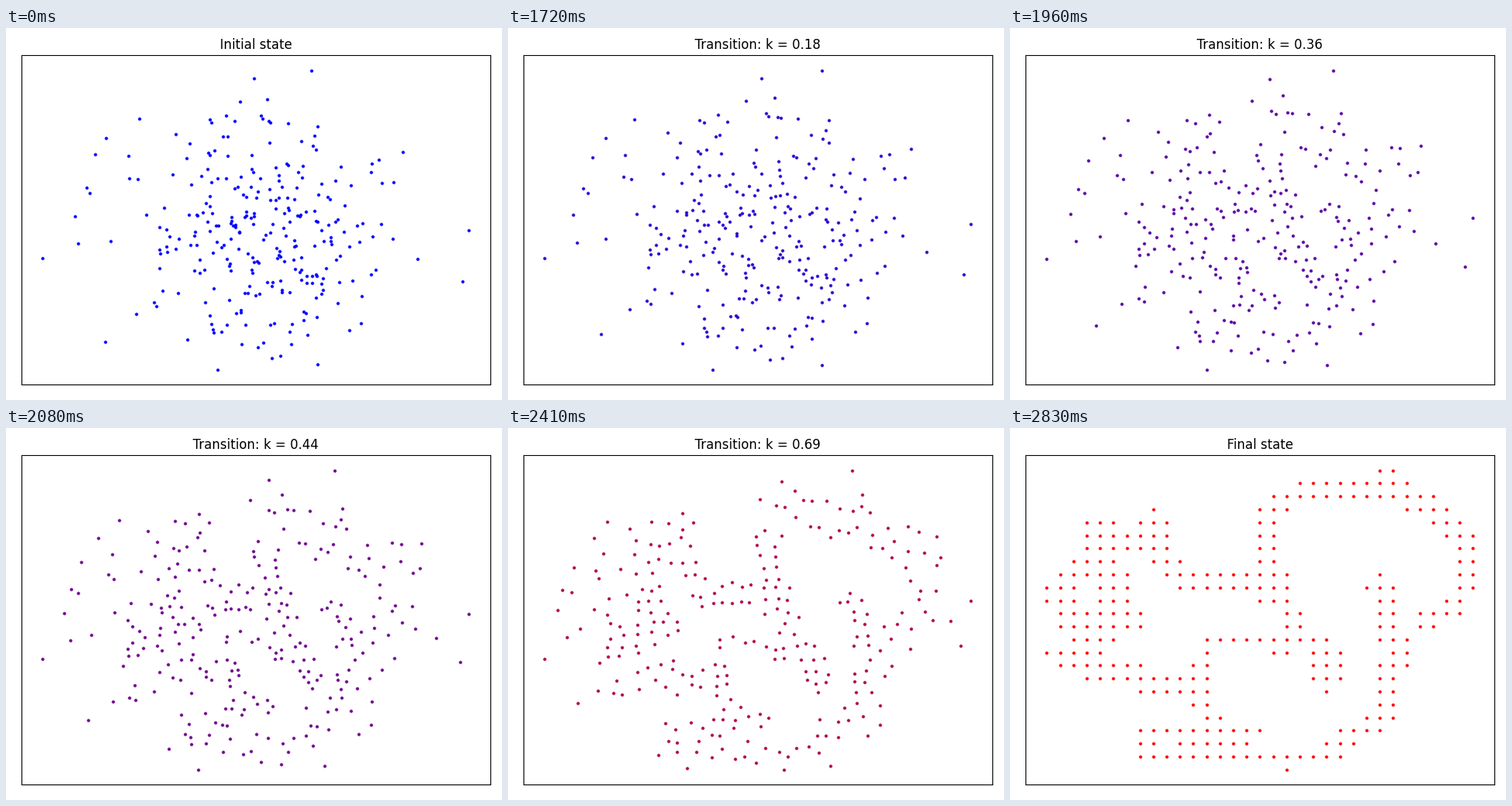
Write a matplotlib script that moves like this. It is 640 px wide and 480 px high and loops after 4.81 s.

```python
import numpy as np
import matplotlib.pyplot as plt
from matplotlib.animation import FuncAnimation

WIDTH, HEIGHT, DPI = 640, 480, 100
INTERVAL, LOOP = 10, 4810
MOVE_START, STEP_MS, STEPS = 1480, 30, 45
COLS, ROWS = 33, 24
SHRINK = np.array([0.68, 0.6])  # final extent relative to the initial one

# The final figure: lattice nodes close to a few brush strokes (column, row).
BROAD, FINE = 1.05, 0.6
BROAD_STROKES = [
    [(17.5, 2.2), (21, 1.4), (26, 0.9), (29, 3.3),
     (31.5, 5), (31.5, 8.5), (30.5, 10.5), (28.7, 11.3)],
    [(17, 3), (16.3, 5), (16.6, 7), (17.5, 9.5), (18.5, 11.5), (17.5, 14)],
    [(8, 6), (11, 8.5), (17, 9.1)],
    [(4, 4.3), (4, 5.6), (8, 5.6), (8, 3.9)],
    [(3, 7), (0.8, 9.3), (1.6, 11.4), (6.8, 11.3)],
    [(5, 8), (5, 12.5), (1, 14.3), (4, 15.7), (11, 16.4)],
    [(25, 8.5), (25.2, 11), (26.2, 13.5), (25.8, 17), (25.2, 19), (21, 21.6)],
    [(21, 13.6), (21, 16.6)],
]
FINE_STROKES = [
    [(20, 13), (12, 13), (11.5, 15), (11.5, 18), (13, 19.3)],
    [(15.5, 20), (7.5, 20), (7.5, 22), (22, 22)],
    [(10.5, 21), (14.5, 21), (18, 22.6)],
]
# Outermost points of the initial cloud, in stage pixels.
OUTLIERS = [(47, 297), (89, 243), (128, 405), (273, 441), (402, 434),
            (589, 327), (597, 261), (394, 55), (320, 65), (129, 142)]


def near_stroke(nodes, stroke, radius):
    hit = np.zeros(len(nodes), bool)
    for a, b in zip(np.array(stroke[:-1]), np.array(stroke[1:])):
        along = np.clip((nodes - a) @ (b - a) / ((b - a) @ (b - a)), 0, 1)
        gap = nodes - a - along[:, None] * (b - a)
        hit |= np.hypot(*gap.T) <= radius
    return hit


def stroke_nodes():
    nodes = np.array([(c, r) for r in range(ROWS) for c in range(COLS)], float)
    hits = [near_stroke(nodes, s, BROAD) for s in BROAD_STROKES]
    hits += [near_stroke(nodes, s, FINE) for s in FINE_STROKES]
    return nodes[np.any(hits, axis=0)]


def gaussian_cloud(count):
    rng = np.random.default_rng(12)
    points = rng.normal((322, 264), (98, 78), (3 * count, 2))
    inside = (((points - (322, 255)) / (245, 175)) ** 2).sum(axis=1) < 1
    return np.vstack([OUTLIERS, points[inside][:count - len(OUTLIERS)]])


def unit(points):
    low, high = points.min(axis=0), points.max(axis=0)
    return (points - low) / (high - low)


def match(cost):
    """Hungarian method: the row assigned to each column."""
    n = len(cost)
    padded = np.zeros((n + 1, n + 1))
    padded[1:, 1:] = cost
    u, v = np.zeros(n + 1), np.zeros(n + 1)
    owner = np.zeros(n + 1, int)
    for row in range(1, n + 1):
        owner[0], col = row, 0
        slack = np.full(n + 1, np.inf)
        used = np.zeros(n + 1, bool)
        way = np.zeros(n + 1, int)
        while True:
            used[col] = True
            current = owner[col]
            reduced = padded[current] - u[current] - v
            better = ~used & (reduced < slack)
            slack[better] = reduced[better]
            way[better] = col
            col = int(np.argmin(np.where(used, np.inf, slack)))
            delta = slack[col]
            u[owner[used]] += delta
            v[used] -= delta
            slack[~used] -= delta
            if owner[col] == 0:
                break
        while col:
            previous = way[col]
            owner[col] = owner[previous]
            col = previous
    return owner[1:] - 1


finish = stroke_nodes()
start = unit(gaussian_cloud(len(finish))) * (COLS - 1, ROWS - 1) / SHRINK
offsets = (start - start.mean(axis=0))[:, None] - (finish - finish.mean(axis=0))
start = start[match((offsets ** 2).sum(axis=2))]

fig = plt.figure(figsize=(WIDTH / DPI, HEIGHT / DPI), dpi=DPI)
ax = fig.add_axes([19.9 / WIDTH, 19.9 / HEIGHT, 605.1 / WIDTH, 424.8 / HEIGHT])
ax.set(xlim=(-0.05, 1.05), ylim=(1.05, -0.05), xticks=[], yticks=[])
title = ax.set_title("Initial state")
dots, = ax.plot([], [], ".", markersize=4)


def update(frame):
    step = (frame * INTERVAL - MOVE_START) // STEP_MS
    k = min(max(step, 0), STEPS) / STEPS
    if step < 0:
        title.set_text("Initial state")
    elif step < STEPS:
        title.set_text(f"Transition: k = {k:.2f}")
    else:
        title.set_text("Final state")
    # The view always fits the current extent of the cloud.
    dots.set_data(*unit((1 - k) * start + k * finish).T)
    dots.set_color((k, 0, 1 - k))
    return dots, title


anim = FuncAnimation(fig, update, frames=LOOP // INTERVAL, interval=INTERVAL,
                     repeat=True, repeat_delay=0)
plt.show()
```
